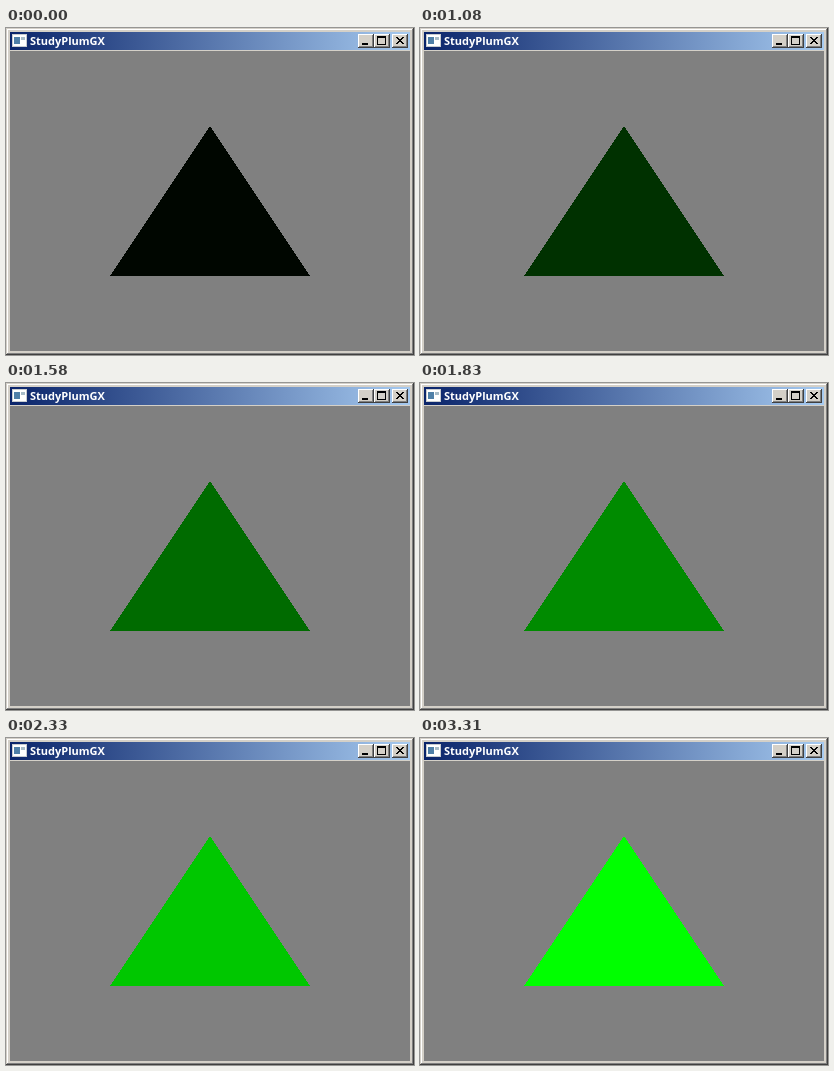
Recreate the animation shown at these times as an HTML page. Size 408 by 327 pixels, loop 3.55 s.

```html
<!DOCTYPE html>
<html lang="en">
<head>
<meta charset="utf-8">
<title>Pulsing triangle</title>
<style>
  html, body { margin: 0; width: 100%; height: 100%; overflow: hidden; }
  svg { display: block; width: 408px; height: 327px; shape-rendering: crispEdges; }
  text { font: bold 11px "Open Sans", "Noto Sans", sans-serif; fill: #fff; }
</style>
</head>
<body>
<svg viewBox="0 0 408 327">
  <defs>
    <linearGradient id="caption">
      <stop stop-color="#0a246a"/>
      <stop offset="1" stop-color="#a6caf0"/>
    </linearGradient>
    <g id="button">
      <path fill="#404040" d="M0 0h16v14H0z"/>
      <path fill="#fff" d="M0 0h15v13H0z"/>
      <path fill="#808080" d="M1 1h14v12H1z"/>
      <path fill="#d4d0c8" d="M1 1h13v11H1z"/>
    </g>
  </defs>

  <!-- Window frame -->
  <path fill="#404040" d="M0 0h408v327H0z"/>
  <path fill="#d4d0c8" d="M0 0h407v326H0z"/>
  <path fill="#808080" d="M1 1h406v325H1z"/>
  <path fill="#fff" d="M1 1h405v324H1z"/>
  <path fill="#d4d0c8" d="M2 2h404v323H2z"/>

  <!-- Title bar -->
  <path fill="url(#caption)" d="M4 4h400v18H4z"/>
  <path fill="#c8ccd0" d="M6 6h15v13H6z"/>
  <path fill="#fff" d="M7 7h13v11H7z"/>
  <path fill="#5080a8" d="M8 9h6v7H8z"/>
  <path fill="#a8bcc8" d="M15 9h4v3h-4z"/>
  <text x="24" y="17">StudyPlumGX</text>
  <g transform="translate(352 6)">
    <use href="#button"/>
    <path d="M4 9h6v2H4z"/>
  </g>
  <g transform="translate(368 6)">
    <use href="#button"/>
    <path fill-rule="evenodd" d="M3 2h9v9H3zM4 4h7v6H4z"/>
  </g>
  <g transform="translate(386 6)">
    <use href="#button"/>
    <path d="M3.5 3h2l7 7h-2zM10.5 3h2l-7 7h-2z"/>
  </g>

  <!-- Client area -->
  <path fill="#808080" d="M4 23h400v300H4z"/>
  <path id="triangle" fill="#000600" d="M204 98L304 248H104z"/>
</svg>
<script>
  const LOOP = 3550;
  const PEAK = 3310;
  // The pulse is held between these moments; the first began before the loop.
  const steps = [-140, 110, 360, 600, 840, 1080, 1330, 1580,
    1830, 2080, 2330, 2580, 2830, 3070, 3310];
  const triangle = document.getElementById("triangle");

  function draw(now) {
    const time = now % LOOP;
    const held = steps.filter(step => step <= time).pop();
    const green = Math.round(127.5 * (1 + Math.cos((held - PEAK) / 1000)));
    triangle.setAttribute("fill", `rgb(0,${green},0)`);
    requestAnimationFrame(draw);
  }
  requestAnimationFrame(draw);
</script>
</body>
</html>
```
